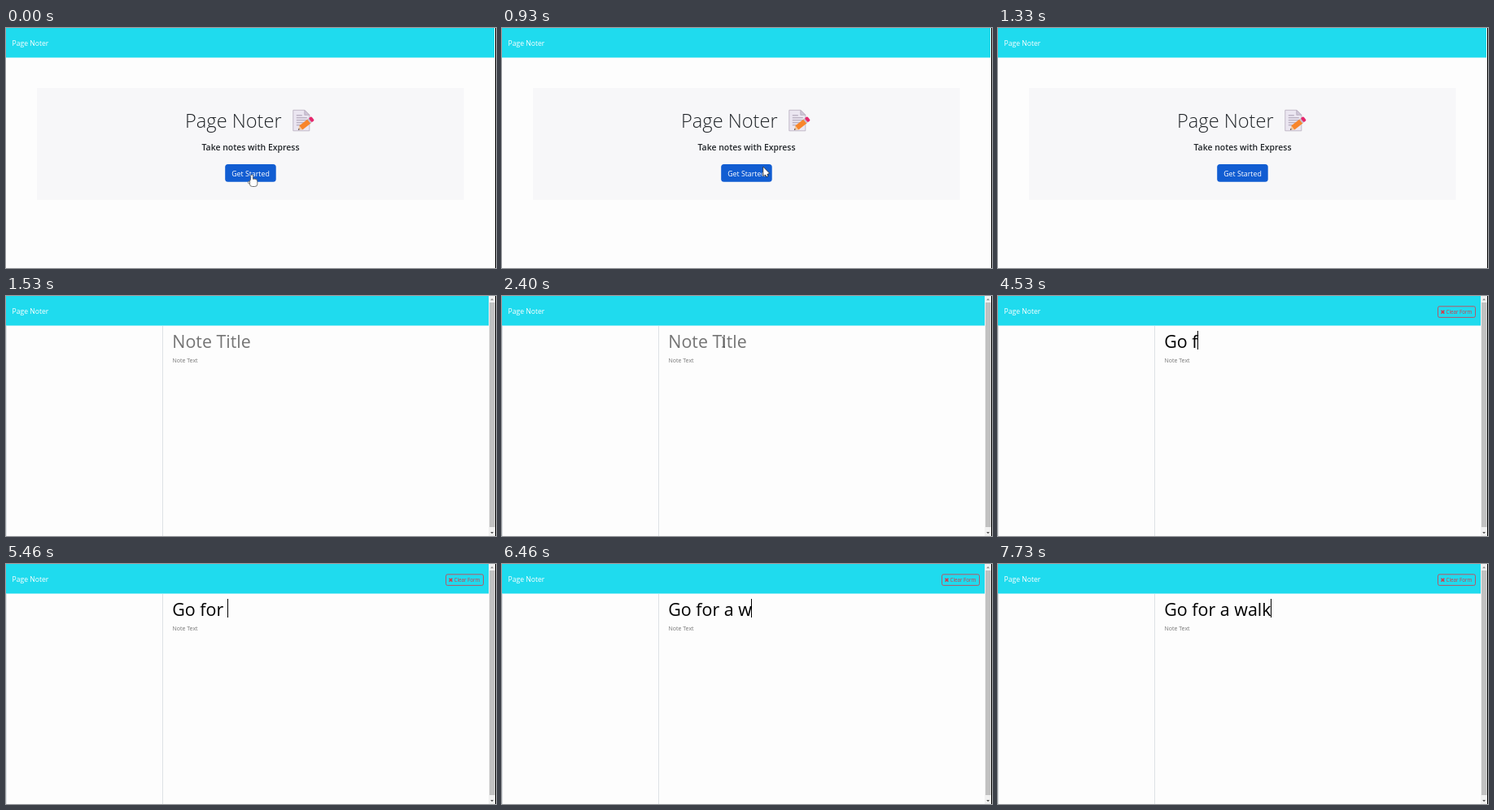
An HTML page with a canvas for the animation above (8 s loop, 602 px wide and 296 px high).

```html
<!DOCTYPE html>
<html lang="en">
<head>
<meta charset="utf-8">
<title>Page Noter</title>
<style>
html, body { margin: 0; width: 100%; height: 100%; overflow: hidden; background: #fdfdfd; }
canvas { display: block; width: 602px; height: 296px; }
</style>
</head>
<body>
<canvas id="stage" width="602" height="296"></canvas>
<script>
const ctx = document.getElementById('stage').getContext('2d');
const LOOP = 8000;
const APP = 'Page Noter';
const NOTE = 'Go for a walk';
const CYAN = '#1fdbee', PAPER = '#fdfdfd', INK = '#212529', RED = '#dc3545', RULE = '#dee2e6';
const LEAVE_AT = 860, GONE_AT = 1330, EDITOR_AT = 1530, FOCUS_AT = 1930;
const TYPE_FROM = 3130, TYPE_TO = 7730;
const TITLE_SIZE = 21.4;

// Steady typing that starts a little slow and catches up towards the end.
function keyTime(i) {
  const p = i / (NOTE.length - 1);
  return TYPE_FROM + (TYPE_TO - TYPE_FROM) * p + 160 * Math.sin(2 * Math.PI * p);
}

function typedCount(t) {
  let n = 0;
  while (n < NOTE.length && t >= keyTime(n) - 0.5) n++;
  return n;
}

// Progress from 0 to 1 in equal jumps.
function stepped(t, from, to, steps) {
  const p = Math.min(1, Math.max(0, (t - from) / (to - from)));
  return Math.floor(p * steps) / steps;
}

function rect(x, y, w, h, color) {
  ctx.fillStyle = color;
  ctx.fillRect(x, y, w, h);
}

function setFont(size, weight = 400) {
  ctx.font = `${weight} ${size}px "Open Sans", sans-serif`;
}

function text(str, x, y, size, color, weight = 400, align = 'left') {
  setFont(size, weight);
  ctx.textAlign = align;
  ctx.fillStyle = color;
  ctx.fillText(str, x, y);
}

function paint(fill, stroke, width = 0.8) {
  if (fill) {
    ctx.fillStyle = fill;
    ctx.fill();
  }
  if (stroke) {
    ctx.strokeStyle = stroke;
    ctx.lineWidth = width;
    ctx.stroke();
  }
}

function poly(points, fill, stroke) {
  ctx.beginPath();
  points.forEach(([x, y]) => ctx.lineTo(x, y));
  ctx.closePath();
  paint(fill, stroke);
}

function box(x, y, w, h, r, fill, stroke) {
  ctx.beginPath();
  ctx.roundRect(x, y, w, h, r);
  paint(fill, stroke);
}

function line(x1, y1, x2, y2, color, width = 0.8) {
  ctx.beginPath();
  ctx.moveTo(x1, y1);
  ctx.lineTo(x2, y2);
  paint(null, color, width);
}

function triangle(x, y, half, height, color) {
  poly([[x - half, y], [x + half, y], [x, y + height]], color);
}

function at(x, y, draw) {
  ctx.save();
  ctx.translate(x, y);
  draw();
  ctx.restore();
}

function memoIcon() {
  poly([[0, 0], [14, 0], [20, 6], [20, 25.5], [0, 25.5]], '#ebe6f1', '#b6adbd');
  poly([[14, 0], [14, 6], [20, 6]], '#cfc6d8', '#b6adbd');
  for (let y = 6; y <= 18; y += 3) line(4, y + 0.5, y < 9 ? 11 : 17, y + 0.5, '#a197ab', 0.9);
  ctx.translate(6, 24.5);
  ctx.rotate(-0.67);
  poly([[0, 0], [4.5, -3.2], [4.5, 3.2]], '#f2c79c');
  rect(0.5, -0.6, 1.5, 1.2, '#47404d');
  rect(4.5, -3.2, 13, 6.4, '#f8852b');
  rect(17, -3.2, 2, 6.4, '#c6bfcc');
  box(19, -3.2, 4.2, 6.4, 1.5, '#e5286d');
}

function handPointer() {
  const fill = '#fff', edge = '#555';
  box(-1.3, 0, 2.7, 10, 1.3, fill, edge);
  box(-4.5, 8, 4, 3, 1.3, fill, edge);
  box(-2.5, 5.2, 9.3, 9.3, 3, fill, edge);
  rect(-0.9, 4, 1.9, 5, fill);
}

function arrowPointer() {
  line(3, 7, 5.2, 12.5, '#222', 3);
  poly([[0, 0], [0, 11.5], [8, 8.3]], '#fff', '#222');
  line(3, 7, 5, 12, '#fff', 1.5);
}

function beamPointer() {
  line(0, -6, 0, 6, '#333');
  for (const y of [-6, 6]) line(-2, y, 2, y, '#333');
}

function navBar(width) {
  rect(0, 0, width, 36.5, CYAN);
  text(APP, 7.5, 22, 8.6, '#fff', 500);
}

function landingPage(t) {
  navBar(600);
  rect(38, 74, 524.5, 138, '#f7f7f9');
  text(APP, 220, 123, 23.6, INK, 300);
  at(352.8, 101.3, memoIcon);
  text('Take notes with Express', 300.5, 150.5, 10.45, INK, 600, 'center');
  box(269.2, 168, 62.5, 21.8, 3.5, '#115dd2');
  text('Get Started', 300.5, 182.5, 8.8, '#fff', 500, 'center');

  if (t >= GONE_AT) return;
  const p = t < LEAVE_AT ? 0 : stepped(t + 67, LEAVE_AT, GONE_AT + 67, 8);
  at(302 + 300 * p * p, 181 - 40 * p, p < 0.25 ? handPointer : arrowPointer);
}

function scrollBar() {
  rect(593, 0, 8, 296, '#f1f1f1');
  rect(594, 8, 6.5, 277, '#c1c1c1');
  triangle(597.1, 5.2, 1.9, -2.2, '#8a8a8a');
  triangle(597.1, 291, 1.9, 2.2, '#505050');
}

function clearButton() {
  box(540.5, 12.8, 46, 13.6, 2, null, RED);
  for (const d of [-1.9, 1.9]) line(546.4 - d, 17.8, 546.4 + d, 21.6, RED, 1.5);
  text('Clear Form', 550.5, 22.3, 6.2, RED);
}

function caret(t, typed) {
  const since = t - (typed ? keyTime(typed.length - 1) : FOCUS_AT);
  if (t < FOCUS_AT || since % 870 >= 470) return;
  setFont(TITLE_SIZE);
  rect(Math.floor(204.3 + ctx.measureText(typed).width), 43, 1, 23, '#000');
}

function editorPointer(t) {
  const p = stepped(t, EDITOR_AT, FOCUS_AT, 5);
  if (p === 0) return;
  const ease = 1 - (1 - p) ** 2;
  at(602 - 330 * ease, 100 - 43 * ease, p < 0.8 ? arrowPointer : beamPointer);
}

function editorPage(t) {
  navBar(593);
  for (const x of [0, 192]) rect(x, 37, 1, 259, RULE);
  scrollBar();

  const typed = NOTE.slice(0, typedCount(t));
  text(typed || 'Note Title', 204.3, 64, TITLE_SIZE, typed ? '#000' : '#757575');
  text('Note Text', 204.5, 82, 7, '#757575');
  if (typed) clearButton();
  else editorPointer(t);
  caret(t, typed);
}

function frame(now) {
  const t = now % LOOP;
  rect(0, 0, 602, 296, PAPER);
  if (t < EDITOR_AT) landingPage(t);
  else editorPage(t);
  rect(601, 0, 1, 296, '#000');
  requestAnimationFrame(frame);
}
requestAnimationFrame(frame);
</script>
</body>
</html>
```
